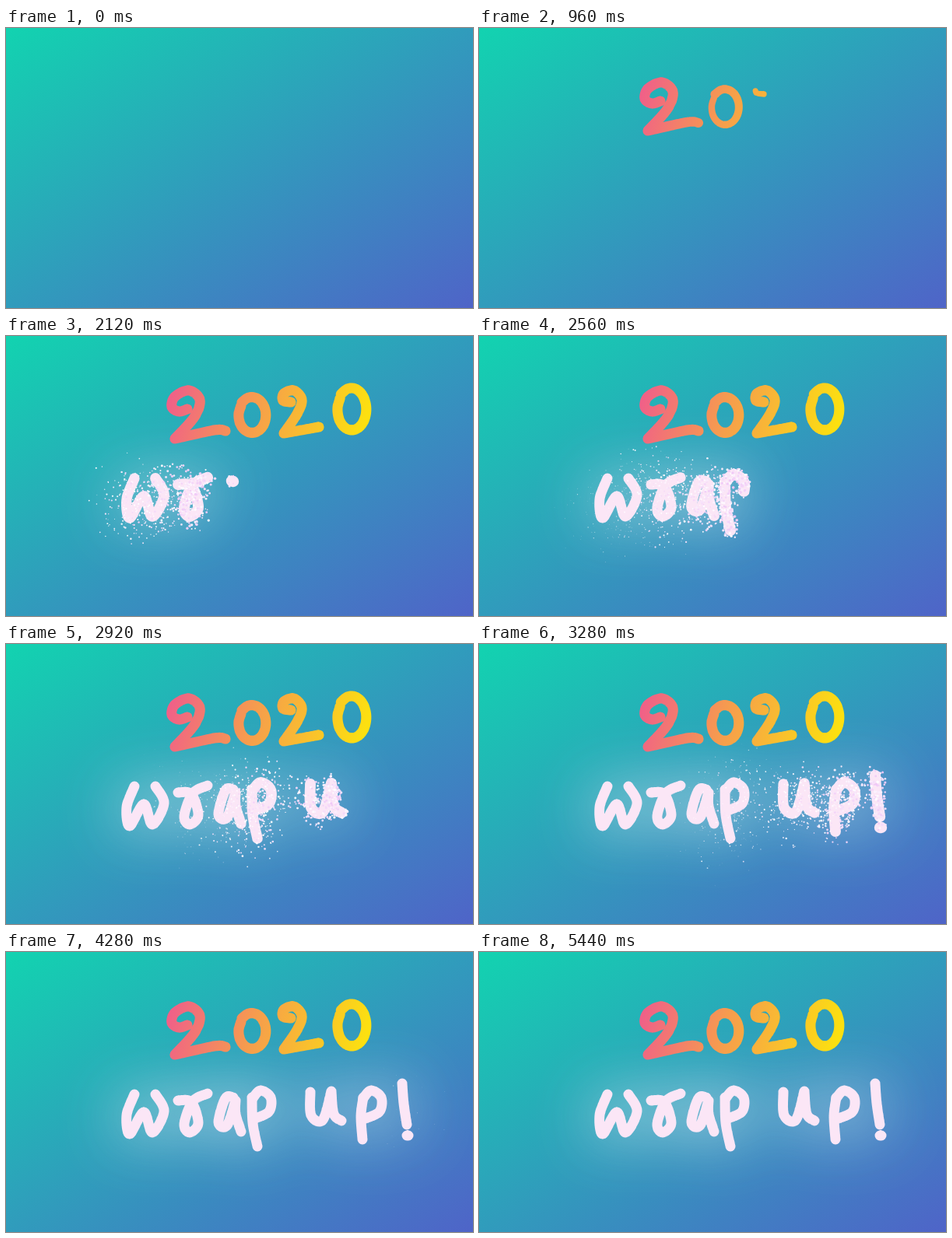
These frames come from a looping animation (600x360 px, 5.48 s). An HTML page with a canvas:

```html
<!DOCTYPE html>
<html lang="en">
<head>
<meta charset="utf-8">
<title>2020 wrap up!</title>
<style>
  html, body { margin: 0; width: 100%; height: 100%; overflow: hidden; }
  body { background: linear-gradient(to bottom right, #12d3b0, #4f64c8); }
  canvas { display: block; }
</style>
</head>
<body>
<canvas id="stage" width="600" height="360" role="img" aria-label="2020 wrap up!"></canvas>
<script>
const LOOP = 5480, STEP = 40;
const START = 300, SPEED = 0.63, LIFT = 60; // ms, px per ms, ms between letters
const LIFE = 1200;
const TAU = Math.PI * 2;
const ctx = document.getElementById('stage').getContext('2d');

const points = text => text.split(' ').map(s => s.split(',').map(Number));

// Clockwise from the upper left, closing slightly inside its beginning.
const ring = (cx, cy, rx, ry) => Array.from({ length: 13 }, (_, i) => {
  const angle = -0.375 * TAU + i / 12 * 0.97 * TAU;
  const size = 1.05 - 0.08 * i / 12;
  return [cx + rx * size * Math.cos(angle), cy + ry * size * Math.sin(angle)];
});

const bowl = (x, y) => points('0,0 10,-10 23,-1 21,17 3,26').map(p => [x + p[0], y + p[1]]);

// Each letter is a list of strokes; a doubled point makes a sharp corner.
const digits = [
  [points('233,94 222,97 213,91 217,78 235,70 249,82 242,104 217,132 217,132 268,121 282,122')],
  [ring(316, 102, 17.5, 22.5)],
  [points('366,85 356,83 357,74 370,70 380,82 374,100 357,125 357,125 402,117')],
  [ring(444, 94.5, 18.5, 26.5)]
];
const letters = [
  [points('165,183 155,210 159,234 177,206 188,232 203,205 192,183')],
  [points('221,191 238,193 247,220 236,232 229,221 240,192 259,182')],
  [points('292,187 282,188 273,219 284,223 295,191 295,191 295,208 302,231')],
  [points('316,187 317,220 323,250'), bowl(317, 188)],
  [points('391,180 392,210 407,216 418,179 418,179 421,208 431,217')],
  [points('459,187 456,211 458,241'), bowl(459, 188)],
  [points('509,169 511,195 515,222'), points('515,236 517,236')]
];

const spline = (a, b, c, d, u) =>
  b + u * (c - a + u * (2 * a - 5 * b + 4 * c - d + u * (3 * (b - c) + d - a))) / 2;

// Dots about 1 px apart along the smooth curve, timed by the pen speed.
let clock = START;
function trace(p) {
  const at = i => p[Math.max(0, Math.min(p.length - 1, i))];
  const dots = [];
  for (let i = 0; i < p.length - 1; i++) {
    const n = Math.ceil(Math.hypot(p[i + 1][0] - p[i][0], p[i + 1][1] - p[i][1]));
    for (let k = i ? 1 : 0; k <= n; k++) {
      const [x, y] = [0, 1].map(c => spline(at(i - 1)[c], at(i)[c], at(i + 1)[c], at(i + 2)[c], k / n));
      const last = dots[dots.length - 1];
      if (last) clock += Math.hypot(x - last.x, y - last.y) / SPEED;
      dots.push({ x, y, t: clock });
    }
  }
  return dots;
}

const write = list => list.flatMap(strokes => {
  const traced = strokes.map(trace);
  clock += LIFT;
  return traced;
});

const numbers = write(digits);
const words = write(letters);
const wordsStart = words[0][0].t;

const warm = ctx.createLinearGradient(215, 60, 470, 130);
warm.addColorStop(0, '#f06088');
warm.addColorStop(0.42, '#f69e4c');
warm.addColorStop(0.95, '#fce010');

let seed = 2020;
function rand() {
  seed = (seed * 16807) % 2147483647;
  return seed / 2147483647;
}

function spark(d) {
  const angle = rand() * TAU;
  const near = 8 * Math.sqrt(rand());
  const reach = 4 + 60 * Math.pow(rand(), 1.4);
  return {
    x: d.x + Math.cos(angle) * near, y: d.y + Math.sin(angle) * near, t: d.t,
    dx: Math.cos(angle) * reach, dy: Math.sin(angle) * reach,
    size: 0.8 + rand(), tint: rand(), life: LIFE * (0.65 + 0.35 * rand())
  };
}
const sparks = words.flat().flatMap(d => [spark(d), spark(d)]);

function drawDots(dots, t, fill, from, to, time) {
  ctx.fillStyle = fill;
  ctx.beginPath();
  for (const d of dots) {
    if (d.t > t) break;
    const r = from + (to - from) * Math.min(1, (t - d.t) / time);
    ctx.moveTo(d.x + r, d.y);
    ctx.arc(d.x, d.y, r, 0, TAU);
  }
  ctx.fill();
}

// Only the shadow lands on the stage; the line itself is far to the left.
function drawGlow(t) {
  const far = 1000;
  ctx.save();
  ctx.shadowColor = 'rgba(225,238,245,0.9)';
  ctx.shadowBlur = 76;
  ctx.shadowOffsetX = far;
  ctx.lineWidth = 13;
  ctx.lineCap = ctx.lineJoin = 'round';
  ctx.beginPath();
  for (const dots of words) {
    dots.forEach((d, i) => {
      if (d.t <= t) ctx[i ? 'lineTo' : 'moveTo'](d.x - far, d.y);
    });
  }
  ctx.stroke();
  ctx.restore();
}

function drawSparks(t) {
  for (const s of sparks) {
    const u = (t - s.t) / s.life;
    if (u < 0 || u >= 1) continue;
    const move = 1 - Math.pow(1 - u, 1.3);
    const pale = Math.min(1, s.tint + 0.6 * u);
    ctx.fillStyle = `rgb(${238 + 17 * pale},${196 + 56 * pale},${246 + 9 * pale})`;
    ctx.globalAlpha = Math.min(0.95, 3 * (1 - u));
    ctx.beginPath();
    ctx.arc(s.x + s.dx * move, s.y + s.dy * move + 6 * u * u, s.size * (1.1 - 0.8 * u), 0, TAU);
    ctx.fill();
  }
  ctx.globalAlpha = 1;
}

function draw(t) {
  ctx.clearRect(0, 0, 600, 360);
  if (t >= wordsStart) drawGlow(t);
  for (const n of numbers) drawDots(n, t, warm, 3.5, 6.6, 400);
  for (const w of words) drawDots(w, t, '#fbe6f6', 7.2, 6.5, 800);
  drawSparks(t);
}

const begin = performance.now();
function tick() {
  const t = (performance.now() - begin) % LOOP;
  draw(Math.floor(t / STEP) * STEP);
  requestAnimationFrame(tick);
}
tick();
</script>
</body>
</html>
```
